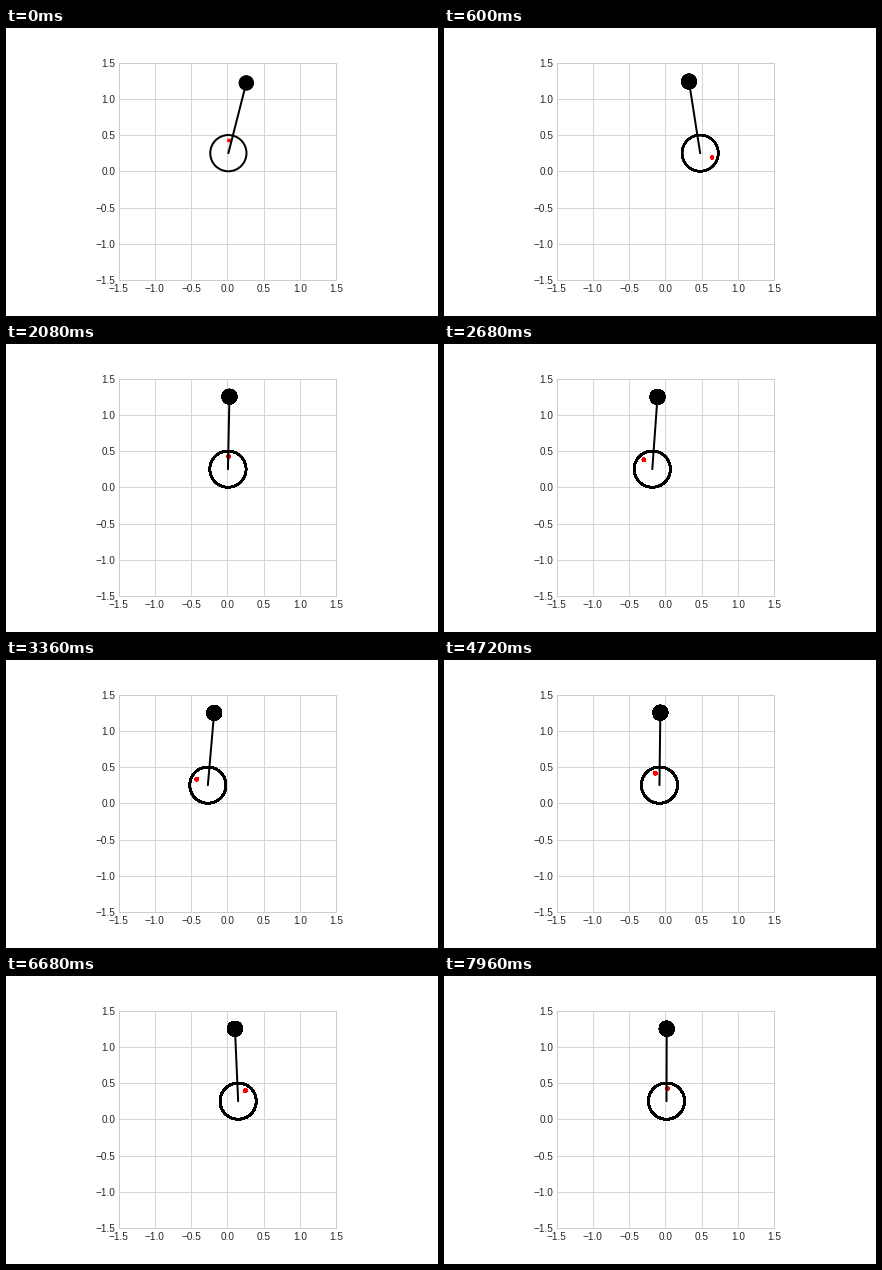
Write a matplotlib script that moves like this. It is 432 px wide and 288 px high and loops after 8000 ms.

```python
import numpy as np
import matplotlib.pyplot as plt
from matplotlib.animation import FuncAnimation
from matplotlib.collections import EllipseCollection

FRAMES = 200
STEP_MS = 40
WHEEL_R = 0.25
ROD = 1.0
DOT_R = 0.175

plt.rcParams.update({
    "font.family": "sans-serif",
    "font.sans-serif": ["Liberation Sans", "DejaVu Sans"],
    "font.size": 10,
    "text.color": "0.15",
    "axes.edgecolor": "0.8",
    "axes.linewidth": 1,
    "axes.grid": True,
    "axes.axisbelow": True,
    "grid.color": "0.8",
    "grid.linewidth": 0.8,
    "xtick.major.size": 0,
    "ytick.major.size": 0,
    "xtick.color": "0.15",
    "ytick.color": "0.15",
    "lines.solid_capstyle": "round",
})

fig = plt.figure(figsize=(6, 4), dpi=72)
fig.subplots_adjust(left=0.125, right=0.9, bottom=0.125, top=0.88)
ax = fig.add_subplot(aspect="equal", xlim=(-1.5, 1.5), ylim=(-1.5, 1.5))
ticks = np.arange(-1.5, 1.6, 0.5)
ax.set_xticks(ticks)
ax.set_yticks(ticks)


def disc(radius, face, edge, width):
    # two equal widths keep sub-pixel placement of each circle
    shape = EllipseCollection(
        [2 * radius], [2 * radius], [0], units="xy", facecolors=face,
        edgecolors=edge, linewidths=[width, width], offsets=[(0, 0)],
        offset_transform=ax.transData)
    ax.add_collection(shape, autolim=False)
    return shape


bob = disc(0.1, "black", "black", 1)
wheel = disc(WHEEL_R, "none", "black", 2)
dot = disc(0.02, "red", "red", 1)
rod, = ax.plot([], [], color="black", lw=2)


def sway(t, size, start):
    """Slow damped swing that crosses zero at `start`."""
    return size * np.exp(-0.188 * t) * np.sin(1.05 * (t - start))


def settle(t, p, q):
    """Fast damped transient of the first catch."""
    return np.exp(-6.2 * t) * (p * np.cos(7 * t) + q * np.sin(7 * t))


def state(t):
    """Wheel position and horizontal offset of the bob."""
    slow_x = sway(t, -0.523, 2.1)
    fast_x = settle(t, -0.408, -0.361)
    slow_lean = sway(t, 0.163, 1.9)
    fast_lean = settle(t, 0.396, 0.326)
    return slow_x + fast_x, slow_lean + fast_lean


def update(i):
    x, lean = state(i * STEP_MS / 1000)
    top = (x + lean, WHEEL_R + np.sqrt(ROD ** 2 - lean ** 2))
    spin = x / WHEEL_R
    mark = (x + DOT_R * np.sin(spin), WHEEL_R + DOT_R * np.cos(spin))

    # circles are stacked once more each frame, which hardens their edges
    for shape, pos in ((bob, top), (wheel, (x, WHEEL_R)), (dot, mark)):
        shape.set_offsets(np.tile(pos, (i + 1, 1)))
    rod.set_data([x, top[0]], [WHEEL_R, top[1]])
    return bob, wheel, dot, rod


def reset():
    return update(0)


anim = FuncAnimation(fig, update, frames=FRAMES, init_func=reset,
                     interval=STEP_MS, repeat=True, repeat_delay=0)
plt.show()
```
